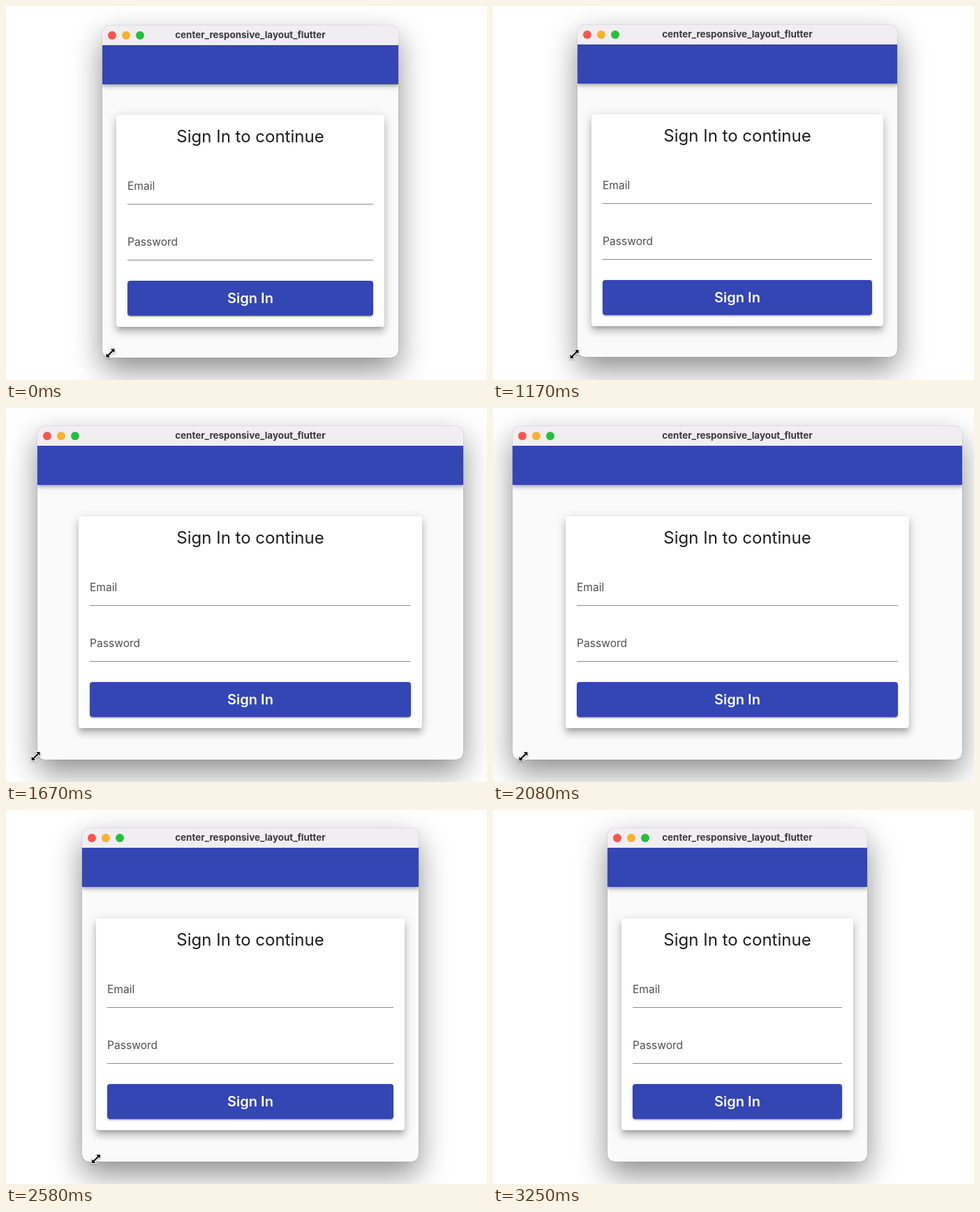
Animation of 689 by 535 pixels, one loop 3.51 s. Source, as an HTML page:

```html
<!DOCTYPE html>
<html lang="en">
<head>
<meta charset="utf-8">
<title>Responsive sign-in window</title>
<style>
  html, body { margin: 0; width: 100%; height: 100%; overflow: hidden; background: #fff; }
  body { position: relative; font-family: Inter, "Open Sans", sans-serif; font-optical-sizing: none; }
  div, svg { position: absolute; box-sizing: border-box; }
  div { white-space: nowrap; }
  #win {
    border-radius: 10px; overflow: hidden; background: #fafafa;
    box-shadow: 0 0 1px rgba(0,0,0,.55), 0 18px 44px rgba(0,0,0,.45);
  }
  .title {
    left: 0; right: 0; top: 0; height: 28px; background: #f0eef1;
    font-size: 13.4px; font-weight: 700; line-height: 27px; color: #3c3a3e; text-align: center;
  }
  .dot { top: 8px; width: 12px; height: 12px; border-radius: 50%; }
  .bar {
    left: 0; right: 0; top: 28px; height: 56px; background: #3446b4;
    box-shadow: 0 2px 4px -1px rgba(0,0,0,.2), 0 4px 5px rgba(0,0,0,.14), 0 1px 10px rgba(0,0,0,.12);
  }
  #card {
    border-radius: 4px; background: #fff;
    box-shadow: 0 5px 5px -3px rgba(0,0,0,.2), 0 8px 10px 1px rgba(0,0,0,.14), 0 3px 14px 2px rgba(0,0,0,.12);
  }
  .head { left: 0; right: 0; top: 16px; font-size: 24px; line-height: 30px; color: #1c1c1c; text-align: center; }
  .field {
    left: 16px; right: 16px; height: 52px; border-bottom: 1px solid #8c8c8c;
    font-size: 15.6px; line-height: 51px; color: #505050;
  }
  .button {
    left: 16px; right: 16px; top: 237px; height: 50px; border-radius: 4px; background: #3446b4;
    font-size: 20px; font-weight: 600; line-height: 50px; color: #fff; text-align: center;
    box-shadow: 0 3px 1px -2px rgba(0,0,0,.2), 0 2px 2px rgba(0,0,0,.14), 0 1px 5px rgba(0,0,0,.12);
  }
  #cursor { left: -10px; top: -10px; filter: drop-shadow(0 1px 1px rgba(0,0,0,.3)); }
</style>
</head>
<body>
<div id="win">
  <div class="bar"></div>
  <div class="title">center_responsive_layout_flutter</div>
  <div class="dot" style="left:8px;background:#fd544f"></div>
  <div class="dot" style="left:28px;background:#fbb02f"></div>
  <div class="dot" style="left:48px;background:#25c03b"></div>
  <div id="card">
    <div class="head">Sign In to continue</div>
    <div class="field" style="top:76px">Email</div>
    <div class="field" style="top:156px">Password</div>
    <div class="button">Sign In</div>
  </div>
</div>
<svg id="cursor" width="20" height="20" viewBox="-10 -10 20 20">
  <path d="M6-6V-.5L4-2.5L-2.5 4L-.5 6H-6V.5L-4 2.5L2.5-4L.5-6Z" stroke="#fff" stroke-width="2" paint-order="stroke"/>
</svg>
<script>
const LOOP = 3510, STEP = 250 / 3, LAST = 39;
const CENTER = 350, BAR_BOTTOM = 84, CARD_MAX = 492, CARD_HEIGHT = 303;

const [win, card, cursor] = ["win", "card", "cursor"].map(id => document.getElementById(id));

// Smooth 0..1 ramp between two steps
function ease(k, from, to) {
  const u = Math.min(1, Math.max(0, (k - from) / (to - from)));
  return u * u * (3 - 2 * u);
}

function place(el, left, top, width, height) {
  Object.assign(el.style, { left: left + "px", top: top + "px", width: width + "px", height: height + "px" });
}

function draw(now) {
  const k = Math.min(LAST, Math.floor((now % LOOP + 4) / STEP));

  // The window's edge is dragged out, then back in past its starting width
  const left = Math.round(138 - 110 * ease(k, 11, 23) + 136 * ease(k, 25, 35.6));
  const width = 2 * (CENTER - left);
  const top = 28 - (k > 12) - (k > 17);
  const height = k > 17 ? 477 : 475;
  const cardWidth = Math.min(width - 40, CARD_MAX);
  place(win, left, top, width, height);
  place(card, (width - cardWidth) / 2, (BAR_BOTTOM + height - CARD_HEIGHT) / 2, cardWidth, CARD_HEIGHT);

  // The pointer settles on the corner and runs slightly ahead of it
  const x = 149.5 - 6 * ease(k, 0, 6) - 108.5 * ease(k, 10.2, 21.9) + 134 * ease(k, 23.1, 35.5);
  const y = 496.5 + 1.5 * ease(k, 0, 6) + ease(k, 23, 29);
  cursor.style.transform = `translate(${x}px, ${y}px)`;
  cursor.style.visibility = k < LAST ? "visible" : "hidden";
}

const start = performance.now();
function tick() {
  draw(performance.now() - start);
  requestAnimationFrame(tick);
}
tick();
</script>
</body>
</html>
```
